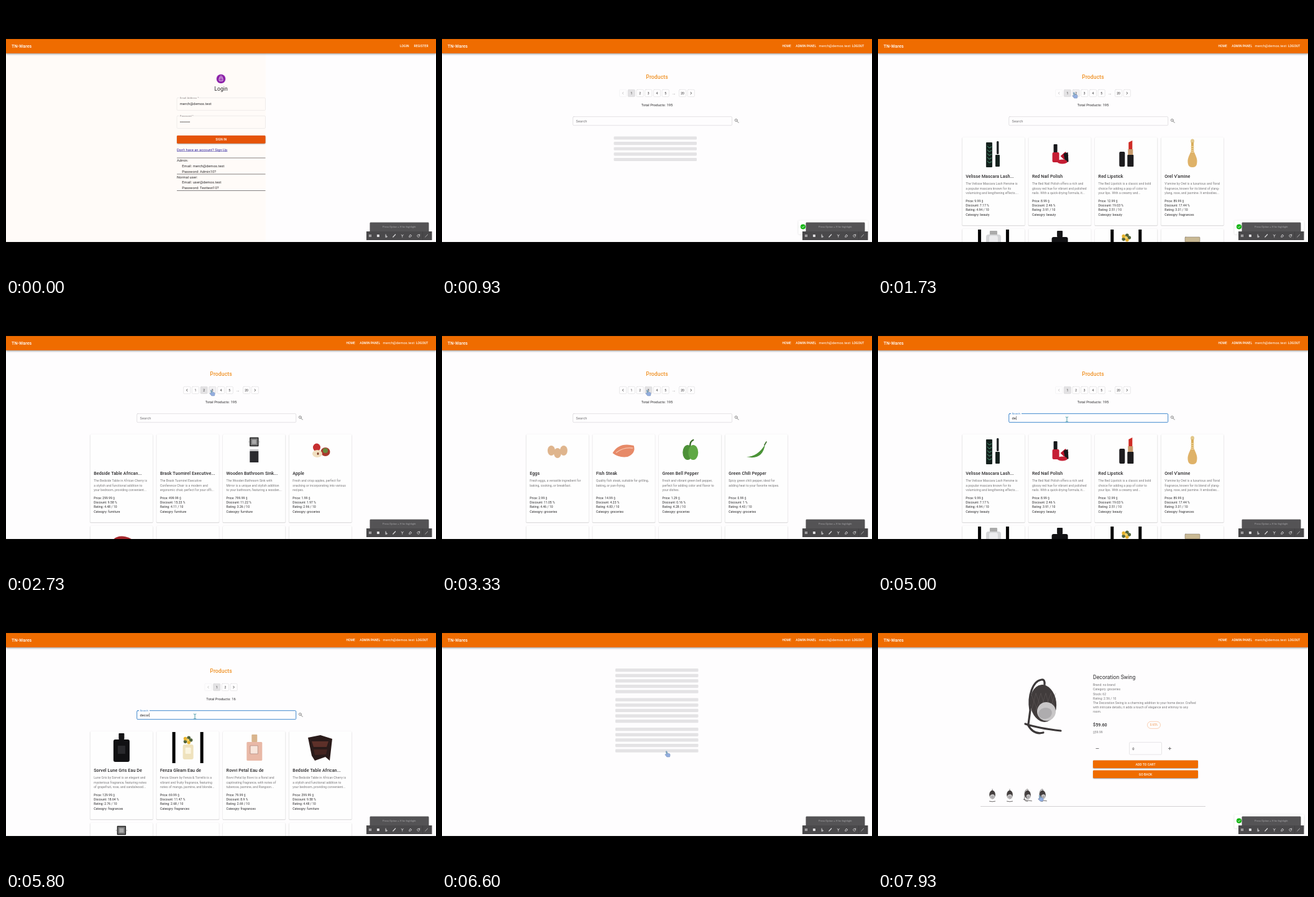
Animation of 692 by 432 pixels, one loop 8000 ms. Source, as an HTML page with a canvas:

```html
<!DOCTYPE html>
<html lang="en">
<head>
<meta charset="utf-8">
<title>Store demo</title>
<style>
html, body { margin: 0; width: 100%; height: 100%; overflow: hidden; background: #000; }
canvas { display: block; width: 692px; height: 432px; }
</style>
</head>
<body>
<canvas id="stage"></canvas>
<script>
const W = 692, H = 432, LOOP = 8000;
const canvas = document.getElementById('stage');
const ctx = canvas.getContext('2d');
const ratio = window.devicePixelRatio || 1;
canvas.width = W * ratio;
canvas.height = H * ratio;

const ORANGE = '#ef6c00', INK = '#29282a', GREY = '#777678';
const EMAIL = 'merch@demos.test';

// ---------- drawing helpers ----------
function rect(x, y, w, h, fill, r = 0, stroke, lw = 0.5) {
  ctx.beginPath();
  ctx.roundRect(x, y, w, h, r);
  if (fill) { ctx.fillStyle = fill; ctx.fill(); }
  if (stroke) { ctx.strokeStyle = stroke; ctx.lineWidth = lw; ctx.stroke(); }
}
function oval(x, y, rx, ry, fill, turn = 0) {
  ctx.beginPath();
  ctx.ellipse(x, y, rx, ry, turn, 0, 7);
  ctx.fillStyle = fill;
  ctx.fill();
}
function path(d, fill, stroke, lw = 1) {
  const p = new Path2D(d);
  if (fill) { ctx.fillStyle = fill; ctx.fill(p); }
  if (stroke) {
    ctx.strokeStyle = stroke;
    ctx.lineWidth = lw;
    ctx.lineCap = ctx.lineJoin = 'round';
    ctx.stroke(p);
  }
}
// y is the middle of the capitals
function text(s, x, y, size = 5.72, color = INK, weight = 400, align = 'left') {
  ctx.font = `${weight} ${size}px Roboto, sans-serif`;
  ctx.letterSpacing = size * 0.01 + 'px';
  ctx.textAlign = align;
  ctx.fillStyle = color;
  ctx.fillText(s, x, y + size * 0.36);
}
function shadow(color, blur, dy, draw) {
  ctx.save();
  ctx.shadowColor = color;
  ctx.shadowBlur = blur * ratio;
  ctx.shadowOffsetY = dy * ratio;
  draw();
  ctx.restore();
}
function at(x, y, draw, scale = 1) {
  ctx.save();
  ctx.translate(x, y);
  ctx.scale(scale, scale);
  draw();
  ctx.restore();
}
function button(label, x, y, w, h, color) {
  shadow('rgba(0,0,0,.4)', 1.6, 0.8, () => rect(x, y, w, h, color, 1.4));
  text(label, x + w / 2, y + h / 2, 5, '#fff', 500, 'center');
}

// ---------- product pictures, centred on 0,0 ----------
const bars = () => { rect(-25, -25, 5, 50, '#000'); rect(20, -25, 5, 50, '#000'); };
function flask(body, cap, label) {
  rect(-4.5, -23, 9, 10, cap, 1);
  rect(-13, -13, 26, 36, body, 3);
  rect(-6, -3, 12, 13, label, 0.5);
}
function swing(front) {
  path(front ? 'M-20 40 Q0 46 20 40 M0 -44 V-30' : 'M-24 27 L-21 5 C-25 -18 -17 -42 -3 -44 Q3 -45 2 -36 M-29 27 Q-8 34 28 38 M-25 28 Q-16 45 0 41', null, '#3c3839', 3.2);
  path('M1 -37 V-33', null, '#777', 0.8);
  oval(0, -6, 21, 30, '#413c3c', front ? 0 : -0.12);
  ctx.globalAlpha *= 0.55;
  for (let i = -2; i < 3; i++) path(`M${i * 8 - 4} -22 L${i * 7 + 5} 6 M${i * 8 + 4} -22 L${i * 7 - 5} 6`, null, '#77706f', 0.6);
  ctx.globalAlpha = 1;
  oval(front ? 0 : 5, 7, front ? 17 : 15, 15, '#c8c6c7', -0.2);
  oval(front ? 0 : 3, 10, 11, 9, '#aeacae', -0.2);
}
const pics = {
  none() {},
  mascara() {
    rect(-12, -18, 10, 40, '#14211d', 1);
    for (let y = -12; y < 18; y += 6) path(`M-10 ${y} l3 3 l4 -2`, null, '#4d9a78', 1);
    rect(5, -20, 3.5, 21, '#24282a', 1.5);
    rect(3, 2, 7, 19, '#14211d', 1);
  },
  polish() {
    rect(-10, -15, 6, 14, '#17181b', 1);
    rect(-12, -2, 11, 16, '#c51e34', 2);
    path('M1 4 L9 -3 L14 3 L7 10 Z', '#b8152c');
    path('M6 0 L9 15 L14 13 L13 -2 Z', '#17181b');
    oval(4, 13, 8, 3.6, '#c51e34');
  },
  lipstick() {
    rect(-11, -3, 9, 24, '#1d1c1e', 2);
    path('M4 -6 V-18 L10 -21 V-6 Z', '#cf2b25');
    rect(3, -7, 8, 10, '#c79a6c');
    rect(2, 2, 10, 19, '#1d1c1e', 1);
  },
  amphora() {
    oval(0, -20, 3, 3.5, '#e2c88b');
    rect(-2, -18, 4, 16, '#d8ad5b');
    path('M-2 -5 C-5 4 -9 8 -7 17 Q-6 22 0 22 Q6 22 7 17 C9 8 5 4 2 -5 Z', '#dfb268');
    for (let y = -12; y < 0; y += 3) rect(-3, y, 6, 1, '#f2dfae');
  },
  clear() {
    bars();
    rect(-6, -23, 12, 7, '#aaa', 1);
    rect(-12, -17, 24, 42, '#d5d6d8', 4);
    rect(-7, -15, 14, 40, '#ececee', 3);
  },
  noir() { flask('#111113', '#141416', '#29292c'); },
  shine() {
    bars();
    rect(-8, -5, 17, 24, '#efe2bd', 3);
    rect(-4, 0, 9, 10, '#faf4df', 1);
    for (let i = 0; i < 5; i++) {
      const a = i * 1.257;
      oval(5 * Math.cos(a), -12 + 4 * Math.sin(a), 2.8, 2.8, i % 2 ? '#e6b32e' : '#53663d');
    }
    oval(0, -12, 2.2, 2.2, '#f6d25c');
  },
  petal() {
    rect(-4, -21, 9, 12, '#d9b58d', 1);
    rect(-12, -9, 25, 30, '#e9b9a7', 1.5);
    rect(-6, -3, 12, 13, '#f8e6dc', 0, '#8f6a60');
  },
  vial() {
    rect(-12, -13, 24, 8, '#c9b994', 1, '#6c6251');
    rect(-9, -5, 18, 28, '#eee5cf', 1);
  },
  table() {
    path('M-20 -16 L0 -20 L19 -14 L15 21 L8 15 L-9 21 L-14 13 Z', '#2a1b1a');
    path('M-14 -10 L13 -10 L10 -1 L-11 -1 Z', '#5d3029');
    path('M-11 3 L11 3 L9 11 L-9 12 Z', '#442420');
  },
  sink() {
    rect(-6.5, -20.5, 13, 13, '#777', 0, '#222', 1.4);
    rect(-3.5, -17.5, 7, 7, '#aaa');
    rect(-9, -14.5, 1, 1, '#777');
    rect(8, -14.5, 1, 1, '#777');
    rect(-7, 1, 14, 18, '#2b2b2f', 0.5);
    rect(-7, -2, 14, 3, '#c7c7c9');
  },
  apple() {
    oval(-6, -5, 6, 6.5, '#c62f30');
    oval(8, 2, 7.5, 7, '#a8382d');
    oval(8, 0, 4, 4, '#688a3f');
    oval(-5, 5, 8, 6, '#f0dfc0');
    oval(-4, 5, 1.5, 2, '#7d3b24');
  },
  steak() { oval(4, 3, 19, 12, '#a5262b', 0.2); oval(5, 4, 14, 8, '#cc5450', 0.2); },
  eggs() { [-10, 0, 10].forEach((x, i) => oval(x, i % 2 * 4, 6, 8, '#dfb58d')); },
  fish() { path('M-18 4 Q-8 -14 16 -8 Q20 4 6 10 Q-8 12 -18 4 Z', '#e78a68'); path('M-12 3 Q0 -6 14 -4', null, '#f7c4ad', 1.4); },
  pepper() { oval(-4, 3, 8, 12, '#4d9138'); oval(5, 3, 8, 12, '#5fa844'); path('M0 -8 Q0 -15 5 -17', null, '#3b6e2a', 2.4); },
  chili() { path('M-16 10 Q2 10 14 -10 Q10 16 -16 10 Z', '#4a9337'); path('M13 -9 l3 -5', null, '#3b6e2a', 1.6); },
  frame() { rect(-14, -18, 28, 36, '#fff', 0, '#33292a', 3); path('M0 13 V-4 M0 3 L-7 -5 M0 0 L7 -9', null, '#504544', 1.4); },
  swing() { at(0, 0, () => swing(false), 0.5); }
};

// title | three lines | price | discount | rating | category | picture
const P = Object.fromEntries(Object.entries({
  mascara: 'Velisse Mascara Lash...|The Velisse Mascara Lash Heroine is|a popular mascara known for its|volumizing and lengthening effects....|9.99|7.17|4.94|beauty',
  polish: 'Red Nail Polish|The Red Nail Polish offers a rich and|glossy red hue for vibrant and polished|nails. With a quick-drying formula, it...|8.99|2.46|3.91|beauty',
  lipstick: 'Red Lipstick|The Red Lipstick is a classic and bold|choice for adding a pop of color to|your lips. With a creamy and...|12.99|19.03|2.51|beauty',
  amphora: "Orel V'amine|V'amine by Orel is a luxurious and floral|fragrance, known for its blend of ylang-|ylang, rose, and jasmine. It embodies...|89.99|17.44|3.31|fragrances",
  table: 'Bedside Table African...|The Bedside Table in African Cherry is|a stylish and functional addition to|your bedroom, providing convenient...|299.99|9.58|4.48|furniture',
  chair: 'Brask Tuomirel Executive...|The Brask Tuomirel Executive|Conference Chair is a modern and|ergonomic chair, perfect for your offi...|499.99|15.23|4.11|furniture',
  sink: 'Wooden Bathroom Sink...|The Wooden Bathroom Sink with|Mirror is a unique and stylish addition|to your bathroom, featuring a wooden...|799.99|11.22|3.26|furniture',
  apple: 'Apple|Fresh and crisp apples, perfect for|snacking or incorporating into various|recipes.|1.99|1.97|2.96|groceries',
  eggs: 'Eggs|Fresh eggs, a versatile ingredient for|baking, cooking, or breakfast.||2.99|11.05|4.46|groceries',
  fish: 'Fish Steak|Quality fish steak, suitable for grilling,|baking, or pan-frying.||14.99|4.23|4.83|groceries',
  pepper: 'Green Bell Pepper|Fresh and vibrant green bell pepper,|perfect for adding color and flavor to|your dishes.|1.29|0.16|4.28|groceries',
  chili: 'Green Chili Pepper|Spicy green chili pepper, ideal for|adding heat to your favorite recipes.||0.99|1|4.43|groceries',
  noir: 'Sorvel Lune Gris Eau De|Lune Gris by Sorvel is an elegant and|mysterious fragrance, featuring notes|of grapefruit, rose, and sandalwood...|129.99|18.64|2.76|fragrances',
  shine: 'Fenza Gleam Eau de|Fenza Gleam by Fenza & Torrello is a|vibrant and fruity fragrance, featuring|notes of mango, jasmine, and blonde...|69.99|11.47|2.68|fragrances',
  petal: 'Rovvi Petal Eau de|Rovvi Petal by Rovvi is a floral and|captivating fragrance, with notes of|tuberose, jasmine, and Rangoon...|79.99|8.9|2.69|fragrances',
  swing: 'Decoration Swing|The Decoration Swing is a charming|addition to your home decor. Crafted|with intricate details, it adds a touch...|59.99|0.65|2.56|groceries',
  frame: 'Family Tree Photo Frame|The Family Tree Photo Frame is a|sentimental and stylish way to display|your cherished family memories...|29.99|1.53|4.52|home-decoration'
}).map(([key, s]) => [key, s.split('|')]));

// keys of the first row, then pictures of the second row
const lists = {
  p1: { row: ['mascara', 'polish', 'lipstick', 'amphora'], next: ['clear', 'noir', 'shine', 'vial'], total: 195 },
  p2: { row: ['table', 'chair', 'sink', 'apple'], blank: 2, next: ['steak', 'none', 'none', 'none'], total: 195 },
  p3: { row: ['eggs', 'fish', 'pepper', 'chili'], next: ['none', 'none', 'none', 'none'], total: 195 },
  dec: { row: ['noir', 'shine', 'petal', 'table'], next: ['sink', 'none', 'none', 'none'], total: 16 },
  decor: { row: ['table', 'sink', 'swing', 'frame'], next: [], total: 4 }
};

// ---------- timeline ----------
const step = (t, keys) => keys.filter(k => k[0] <= t).pop()[1];
const clamp = v => Math.max(0, Math.min(1, v));
const ease = v => v * v * (3 - 2 * v);

const VIEW = [[0, 'login'], [380, 'load'], [960, 'p1'], [1830, 'load'], [2230, 'p2'], [2830, 'load'], [3200, 'p3'],
  [3880, 'load'], [4110, 'p1'], [5200, 'load'], [5450, 'dec'], [5870, 'load'], [5960, 'decor'], [6500, 'wait'], [6800, 'detail']];
const TOTAL = [[0, 195], [5450, 16], [5960, 4]];
const PAGE = [[0, 1], [1830, 2], [2830, 3], [3880, 1]];
const SELECTED = [[0, 1], [1900, 2], [2900, 3], [4000, 1]];
const QUERY = [[0, ''], [4750, 'd'], [4900, 'de'], [5060, 'dec'], [5600, 'deco'], [5740, 'decor']];
const MOVES = [[1000, 346, 215], [1600, 317, 143], [2300, 317, 143], [2600, 332, 144], [3450, 332, 144], [3800, 305, 145],
  [4300, 305, 145], [4550, 304, 187], [6150, 304, 187], [6430, 363, 247], [7050, 363, 247], [7650, 262, 318], [LOOP, 262, 318]];

function pointer(t) {
  const i = MOVES.findIndex(m => m[0] > t);
  if (i < 1) return null;
  const [t0, x0, y0] = MOVES[i - 1], [t1, x1, y1] = MOVES[i];
  const k = ease((t - t0) / (t1 - t0));
  return { x: x0 + (x1 - x0) * k, y: y0 + (y1 - y0) * k };
}

// ---------- screens ----------
function header(loggedIn) {
  shadow('rgba(0,0,0,.45)', 3, 1, () => rect(0, 53, W, 23, ORANGE));
  text('TN-Wares', 9, 64.3, 7.15, '#fff', 500);
  const nav = (s, x) => text(s, x, 64.3, 5, '#fff', 500);
  if (!loggedIn) { nav('LOGIN', 634); nav('REGISTER', 656.5); return; }
  nav('HOME', 547.5);
  nav('ADMIN PANEL', 569.3);
  text(EMAIL, 606.5, 64.2, 5.72, '#fff');
  nav('LOGOUT', 660);
}

function login() {
  rect(0, 76, 418, 303, '#fffbf8');
  oval(346, 117, 7.3, 7.3, '#8e24aa');
  rect(343.2, 115.6, 5.6, 4.6, null, 0.5, '#fff', 0.8);
  path('M344.3 115.4 v-1.3 a1.7 1.7 0 0 1 3.4 0 v1.3', null, '#fff', 0.7);
  oval(346, 118, 0.7, 0.7, '#fff');
  text('Login', 346, 132.7, 8.6, INK, 400, 'center');
  [['Email Address *', 147.5, 31], ['Password *', 176.5, 23]].forEach(([label, y, w]) => {
    rect(275, y, 142.5, 20, null, 1.4, '#dfdcdc');
    rect(278.5, y - 1, w, 2, '#fffbf8');
    text(label, 279.8, y - 0.2, 4.2, '#8b8787');
  });
  text(EMAIL, 279.8, 157.3);
  for (let i = 0; i < 8; i++) oval(280.8 + i * 2.05, 186.3, 0.75, 0.75, '#444');
  button('SIGN IN', 275, 208, 142.5, 12.7, '#e65408');
  text("Don't have an account? Sign Up", 275, 231, 5.72, '#3226a0');
  rect(275, 233.6, 81.5, 0.5, '#3226a0');
  [244, 270, 296.5].forEach(y => rect(275, y - 0.4, 142.5, 0.8, '#858284'));
  ['Admin:', 'Email: ' + EMAIL, 'Password: Admin10?', 'Normal user:', 'Email: user@demos.test', 'Password: Testtest10?']
    .forEach((s, i) => text(s, i % 3 ? 283.3 : 275, 248.4 + i * 8.72));
}

function skeleton(x, y) {
  for (let i = 0; i < 5; i++) rect(x, y + i * 8.62, 133.5, 5.2, '#e4e3e5', 1.4);
}

function pagination(t, mouse) {
  const total = step(t, TOTAL), page = step(t, PAGE), selected = step(t, SELECTED);
  const labels = total > 100 ? [1, 2, 3, 4, 5, '…', 20] : total > 10 ? [1, 2] : [1];
  const items = ['<', ...labels, '>'];
  items.forEach((s, i) => {
    const x = 346 + (i - (items.length - 1) / 2) * 13.7, y = 140;
    if (s === '…') { text('...', x, y + 0.3, 5, INK, 400, 'center'); return; }
    const off = (s === '<' && page === 1) || (s === '>' && labels.length === 1);
    const hover = mouse && Math.abs(mouse.x - x) < 6 && Math.abs(mouse.y - y) < 7;
    const fill = s === selected ? '#e3e2e4' : hover && !off ? '#f1f0f2' : null;
    rect(x - 5.6, y - 5.7, 11.2, 11.4, fill, 1.4, off ? '#ececee' : '#d5d4d6');
    if (s === '<' || s === '>') {
      const d = s === '<' ? 1 : -1;
      path(`M${x + 0.8 * d} ${y - 1.7} l${-1.7 * d} 1.7 l${1.7 * d} 1.7`, null, off ? '#bbb' : '#333', 0.8);
    } else text(String(s), x, y, 5, INK, 400, 'center');
  });
}

function searchBox(t) {
  const focused = t >= 4560, query = step(t, QUERY);
  rect(210.7, 177.7, 256, 14, null, 1.4, focused ? '#2b7bc9' : '#c8c7ca', focused ? 0.9 : 0.5);
  if (focused) {
    rect(214, 176.5, 17, 2.4, '#fefdfe');
    text('Search', 215.5, 177.5, 4.3, '#2b7bc9');
    text(query, 215.5, 184.6);
    const x = 215.8 + ctx.measureText(query).width;
    rect(x, 181.5, 0.5, 6.4, INK);
  } else text('Search', 215.5, 184.7, 5.72, '#757477');
  ctx.beginPath();
  ctx.arc(473.3, 183.4, 1.9, 0, 7);
  ctx.strokeStyle = '#666';
  ctx.lineWidth = 0.8;
  ctx.stroke();
  path('M474.8 185 l2.4 2.4', null, '#666', 0.9);
}

function card(x, y, product, pic) {
  shadow('rgba(0,0,0,.28)', 1.2, 0.6, () => rect(x, y, 100.7, 141.5, '#fefefe', 1.4));
  at(x + 50.4, y + 26, pics[pic] || pics.none);
  if (!product) return;
  const [title, a, b, c, price, discount, rating, category] = product;
  text(title, x + 5.7, y + 62.7, 7.15, INK, 500);
  [a, b, c].forEach((s, i) => text(s, x + 5.7, y + 74.6 + i * 7.15, 5, GREY));
  [`Price: ${price} $`, `Discount: ${discount} %`, `Rating: ${rating} / 10`, `Cateogry: ${category}`]
    .forEach((s, i) => text(s, x + 5.7, y + 102.1 + i * 7.2, 5));
}

function home(t, view, mouse) {
  text('Products', 346, 113.5, 8.6, '#f09226', 500, 'center');
  pagination(t, mouse);
  text('Total Products: ' + step(t, TOTAL), 346, 158.6, 5.72, INK, 400, 'center');
  searchBox(t);
  const list = lists[view];
  if (!list) { skeleton(276.5, 209.4); return; }
  const column = i => 135.5 + i * 106.7;
  list.row.forEach((key, i) => card(column(i), 211, P[key], i < (list.blank || 0) ? 'none' : key));
  list.next.forEach((pic, i) => card(column(i), 358, null, pic));
}

function detail(t) {
  at(266, 172, () => swing(t < 7650));
  [184, 212, 241, 265].forEach((x, i) => at(x, 314, () => swing(i < 2), 0.23));
  rect(165, 331, 362, 0.8, '#c6c4c6');
  text('Decoration Swing', 346, 124.4, 8.6);
  ['Brand: no brand', 'Category: groceries', 'Stock: 62', 'Rating: 2.56 / 10',
    'The Decoration Swing is a charming addition to your home decor. Crafted',
    'with intricate details, it adds a touch of elegance and whimsy to any', 'room.']
    .forEach((s, i) => text(s, 346, 136.4 + i * 7.2, 5, GREY));
  text('$59.60', 346, 200.7, 7.15, INK, 500);
  text('$59.99', 346, 212.5, 5, GREY);
  rect(433.5, 195.2, 21, 11.2, null, 5.6, '#f3a168');
  text('0.65%', 444, 200.8, 4.6, '#f0964f', 400, 'center');
  rect(350.5, 238.1, 5, 0.8, '#555');
  rect(404.5, 228.6, 52, 19.6, null, 1.4, '#cfcdd0');
  text('0', 409.3, 238.6);
  rect(467, 238.1, 5, 0.8, '#555');
  rect(469.1, 236, 0.8, 5, '#555');
  button('ADD TO CART', 346, 257.4, 169, 12.6, ORANGE);
  button('GO BACK', 346, 273.5, 169, 12.6, ORANGE);
}

function toast(t) {
  const shown = t < 4000 ? ease(clamp((t - 520) / 240)) - ease(clamp((t - 2380) / 240)) : ease(clamp((t - 7250) / 260));
  if (shown <= 0) return;
  const x = 573.5 + (1 - shown) * 120;
  shadow('rgba(0,0,0,.14)', 3, 0.5, () => rect(x, 344.5, 112, 22, '#fff', 1.4));
  oval(x + 7.5, 354.5, 4.1, 4.1, '#14b514');
  path(`M${x + 5.7} 354.6 l1.4 1.4 l2.4 -2.8`, null, '#fff', 0.8);
}

function recorderBar() {
  rect(585.5, 347.5, 95, 15, '#545355', [1.4, 1.4, 0, 0]);
  rect(580, 362, 105.5, 14, '#4a494b');
  text('Press Option + H for highlight', 632.8, 355, 4, '#aaa9ab', 400, 'center');
  const c = '#dddcde';
  const icons = [
    () => { rect(-1.7, -2, 1.2, 4, c); rect(0.5, -2, 1.2, 4, c); },
    () => rect(-2, -2, 4, 4, c, 0.4),
    () => { path('M-.8 -2.2 V1.6 M-.8 0 L1.5 1 L1 2.2 H-1', null, c, 0.9); },
    () => path('M-2 2 L1.8 -2', null, c, 1.2),
    () => path('M-1.7 -1.8 L0 0 L1.7 -1.8 M0 -.8 V2.2', null, c, 0.8),
    () => path('M-2 1 L0 -2 L2 0 L0 2 H-2', null, c, 0.9),
    () => path('M1.8 -.9 A2 2 0 1 0 2 .6 M2 -2.2 V-.8 H.6', null, c, 0.8),
    () => path('M-2 2 L2 -2', null, c, 0.7)
  ];
  icons.forEach((draw, i) => at(586 + i * 12.95, 369, draw));
  rect(670, 362.5, 0.5, 13, '#39383a');
}

function cursor(mouse, view) {
  if (!mouse) return;
  at(mouse.x, mouse.y, () => {
    const overInput = view !== 'wait' && view !== 'detail' && Math.abs(mouse.y - 185) < 7;
    if (overInput) {
      path('M-1.8 -4 Q0 -4 0 -3 V3 Q0 4 -1.8 4 M1.8 -4 Q0 -4 0 -3 M0 3 Q0 4 1.8 4', null, '#4f9cab', 1);
    } else {
      path('M-2.6 -4 Q-1.4 -5 -.8 -3.4 L0 -1 L3.6 0 Q4.8 2 3.4 5 H-1.2 L-4 1.4 Q-4 0 -2 1 Z', '#93aee0', '#7891bd', 0.6);
      path('M-2 -3.4 L-.9 0', null, '#72aaa0', 1);
    }
  });
}

function render(t) {
  ctx.setTransform(ratio, 0, 0, ratio, 0, 0);
  rect(0, 0, W, H, '#000');
  const view = step(t, VIEW), mouse = pointer(t);
  ctx.save();
  ctx.beginPath();
  ctx.rect(0, 53, W, 326);
  ctx.clip();
  rect(0, 53, W, 326, '#fefdfe');
  if (view === 'login') login();
  else if (view === 'wait') [110.1, 157.6, 205.1].forEach(y => skeleton(279, y));
  else if (view === 'detail') detail(t);
  else home(t, view, mouse);
  header(view !== 'login');
  toast(t);
  recorderBar();
  cursor(mouse, view);
  ctx.restore();
}

const start = performance.now();
function tick() {
  render((performance.now() - start) % LOOP);
  requestAnimationFrame(tick);
}
tick();
</script>
</body>
</html>
```
